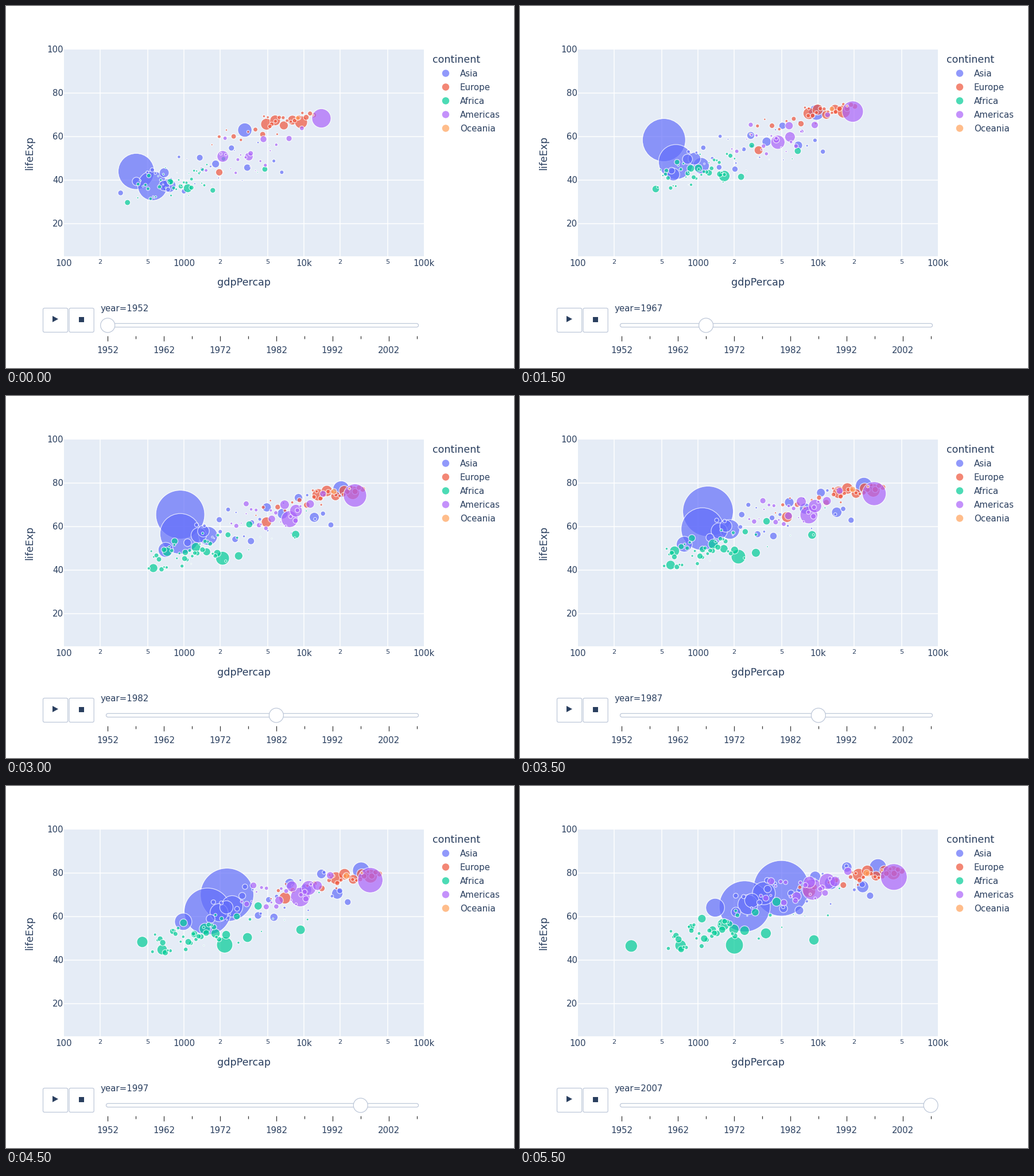
Animation, 885 px wide and 632 px high, one loop 6 s. Source, as a matplotlib script:

```python
import numpy as np
import matplotlib.pyplot as plt
from collections import namedtuple
from matplotlib.animation import FuncAnimation
from matplotlib.patches import Circle, FancyBboxPatch, Polygon, Rectangle
from matplotlib.colors import to_rgba

W, H, DPI = 885, 632, 100
PT = 72 / DPI
INK, BORDER, PLOT_BG = "#2a3f5f", "#bec8d9", "#e5ecf6"
LEFT, TOP, RIGHT, BOTTOM = 101, 76, 728, 437
STEPS = 12
COLORS = {"Asia": "#636efa", "Europe": "#ef553b", "Africa": "#00cc96",
          "Americas": "#ab63fa", "Oceania": "#ffa15a"}
GROWTH = {"Asia": 2.9, "Europe": 1.2, "Africa": 3.8, "Americas": 3, "Oceania": 2.3}

# Largest countries: millions of people, GDP per head and life expectancy
# at the start, the middle and the end
LARGE = {
    "Asia": [((556, 943, 1319), (400, 741, 4959), (44, 44.5, 58.4, 65.5, 73)),
             ((372, 634, 1110), (547, 813, 2452), (37.4, 54.2, 64.7)),
             ((82, 223), (750, 1383, 3541), (37.5, 52.7, 70.7)),
             ((86, 114, 127), (3217, 16610, 31656), (63, 75.4, 82.6)),
             ((41, 169), (685, 1176, 2606), (43.4, 54, 65.5)),
             ((47, 150), (684, 660, 1391), (37.5, 46.9, 64.1))],
    "Europe": [((22, 71), (1969, 4269, 8458), (43.6, 59.5, 71.8))],
    "Africa": [((33, 135), (1077, 1982, 2014), (36.3, 44.5, 46.9)),
               ((14, 65), (781, 796, 278), (39.1, 47.8, 46.5)),
               ((14, 44), (4725, 8028, 9270), (45, 56, 49.3))],
    "Americas": [((158, 301), (13990, 24073, 42952), (68.4, 73.4, 78.2)),
                 ((57, 190), (2109, 6660, 9066), (50.9, 61.5, 72.4)),
                 ((30, 109), (3478, 7675, 11978), (50.8, 65, 76.2))],
}

# The other countries scatter around a common path from start to end
Crowd = namedtuple("Crowd", "count pop pop_spread gdp gdp_spread life life_spread")
CROWDS = {
    "Asia": [Crowd(9, 45, .18, (1000, 7000), .33, (43, 71), 6),
             Crowd(18, 6, .35, (1800, 7500), .35, (46, 72), 6)],
    "Europe": [Crowd(5, 58, .1, (6800, 30500), .09, (66.5, 80), 1),
               Crowd(14, 8, .2, (7500, 31000), .13, (68.5, 79.5), 1.5),
               Crowd(10, 6, .3, (3200, 11500), .17, (61, 74.5), 2.2)],
    "Africa": [Crowd(10, 36, .15, (850, 1800), .25, (39, 56), 5),
               Crowd(28, 9, .25, (800, 1100), .18, (38.5, 52), 4),
               Crowd(11, 2, .3, (1700, 5000), .3, (43, 60), 6)],
    "Americas": [Crowd(7, 28, .2, (4600, 8500), .2, (57, 74), 4),
                 Crowd(15, 6, .3, (2700, 6500), .18, (48, 72), 4)],
    "Oceania": [Crowd(2, 9, .22, (10300, 29500), .04, (69.2, 80.7), .3)],
}


def curve(values):
    """Value at every step: smooth through 2 or 3 points, straight lines for 5."""
    steps = np.arange(STEPS)
    if len(values) == 5:
        return np.interp(steps, (0, 2, 3, 6, 11), values)
    keys = (0, 11) if len(values) == 2 else (0, 5, 11)
    return np.polyval(np.polyfit(keys, values, len(values) - 1), steps)


def slowing(start, end):
    return curve((start, start + .57 * (end - start), end))


def bubble(root_pop, log_gdp, life):
    """Pixel x, y and radius at every step."""
    return LEFT + 209 * (log_gdp - 2), BOTTOM - 3.8 * (life - 5), 1.338 * root_pop


def crowd(rng, spec, growth):
    ranks = np.linspace(-1.6, 1.6, spec.count)
    wealth, health, size = (rng.permutation(ranks) for _ in range(3))
    root_pop = np.sqrt(np.array([spec.pop / growth, spec.pop]))
    for w, h, s in zip(wealth, health, size):
        yield bubble(curve(root_pop * 10 ** (spec.pop_spread * s / 2)),
                     slowing(*np.log10(spec.gdp)) + spec.gdp_spread * w,
                     slowing(*spec.life) + spec.life_spread * (.5 * w + .85 * h))


def build():
    rng = np.random.default_rng(7)
    tracks, colors = [], []
    for continent, color in COLORS.items():
        group = [bubble(curve(np.sqrt(pop)), curve(np.log10(gdp)), curve(life))
                 for pop, gdp, life in LARGE.get(continent, [])]
        for spec in CROWDS[continent]:
            group.extend(crowd(rng, spec, GROWTH[continent]))
        tracks += group
        colors += [color] * len(group)
    return np.array(tracks), colors


def marker_sizes(radius):
    """Alternate the areas of each disc and of the ring around it."""
    both = np.column_stack([np.maximum(radius - .5, 0), radius]).ravel()
    return (2 * both * PT) ** 2


def markers(x, y, radius, colors):
    n, clear, white = len(colors), (0, 0, 0, 0), (1, 1, 1, .7)
    faces = [c for color in colors for c in (to_rgba(color, .7), clear)]
    return ax.scatter(np.repeat(x, 2), np.repeat(y, 2), s=marker_sizes(radius),
                      facecolors=faces, edgecolors=[clear, white] * n,
                      linewidths=[0, 1.25 * PT] * n, zorder=3)


def text(x, y, label, size=15, ha="center", **kw):
    return ax.text(x, y, label, fontsize=size * PT, ha=ha, va="baseline",
                   color=INK, **kw)


def line(x, y, color, width):
    ax.plot(x, y, color=color, lw=width * PT, solid_capstyle="butt", zorder=1)


def box(x, y, w, h, rounding):
    ax.add_patch(FancyBboxPatch((x, y), w, h, fc="white", ec=BORDER, lw=1.25 * PT,
                                boxstyle=f"round,pad=0,rounding_size={rounding}"))


def draw_axes():
    area = Rectangle((LEFT, TOP), RIGHT - LEFT, BOTTOM - TOP, fc=PLOT_BG, lw=0, zorder=0)
    ax.add_patch(area)
    for value in range(20, 101, 20):
        y = BOTTOM - 3.8 * (value - 5)
        if value < 100:
            line((LEFT, RIGHT), (y, y), "white", 1.5)
        text(100, y + 5.4, value, ha="right")
    for decade, label in enumerate(("100", "1000", "10k", "100k")):
        x = LEFT + 209 * decade
        text(x, 454, label)
        if 0 < decade < 3:
            line((x, x), (TOP, BOTTOM), "white", 1.5)
        if decade < 3:
            for digit in (2, 5):
                minor = x + 209 * np.log10(digit)
                line((minor, minor), (TOP, BOTTOM), "white", 1.5)
                text(minor, 450.3, digit, 11.25)
    text(414.5, 488, "gdpPercap", 17.5)
    text(46.7, 256.5, "lifeExp", 17.5, rotation=90, rotation_mode="anchor")
    return area


def draw_legend():
    text(743, 99, "continent", 17.5, "left")
    rows = 117.5 + 24 * np.arange(len(COLORS))
    markers(np.full(len(rows), 766), rows, np.full(len(rows), 6.9), list(COLORS.values()))
    for y, name in zip(rows, COLORS):
        text(791, y + 5.5, name, ha="left")


def slider_x(step):
    return 177.2 + 48.95 * step


def draw_controls():
    for x in (64.5, 110):
        box(x, 527.5, 43.2, 42, 2.5)
    ax.add_patch(Polygon([(81, 541), (81, 552), (91, 546.5)], fc=INK, lw=0))
    ax.add_patch(Rectangle((127, 543), 9, 8.5, fc=INK, lw=0))
    box(174.5, 554.3, 544, 6.3, 3.1)
    for step in range(STEPS):
        x = slider_x(step)
        line((x, x), (576, 581 if step % 2 else 585), "#333333", 1.25)
        if step % 2 == 0:
            text(x, 605.5, 1952 + 5 * step)


def update(step):
    x, y, radius = tracks[:, :, step].T
    bubbles.set_offsets(np.repeat(np.column_stack([x, y]), 2, axis=0))
    bubbles.set_sizes(marker_sizes(radius), DPI)
    grip.center = slider_x(step), 557.5
    year.set_text(f"year={1952 + 5 * step}")
    return bubbles, grip, year


plt.rcParams["font.family"] = "DejaVu Sans"
fig = plt.figure(figsize=(W / DPI, H / DPI), dpi=DPI, facecolor="white")
ax = fig.add_axes([0, 0, 1, 1])
ax.set(xlim=(0, W), ylim=(H, 0), autoscale_on=False)
ax.axis("off")

area = draw_axes()
draw_legend()
draw_controls()
tracks, colors = build()
bubbles = markers(*tracks[:, :, 0].T, colors)
bubbles.set_clip_path(area)
grip = ax.add_patch(Circle((0, 557.5), 12.5, fc="white", ec=BORDER, lw=1.25 * PT, zorder=4))
year = text(164.5, 533, "", ha="left")

animation = FuncAnimation(fig, update, frames=STEPS, interval=500,
                          repeat=True, repeat_delay=0)
plt.show()
```
